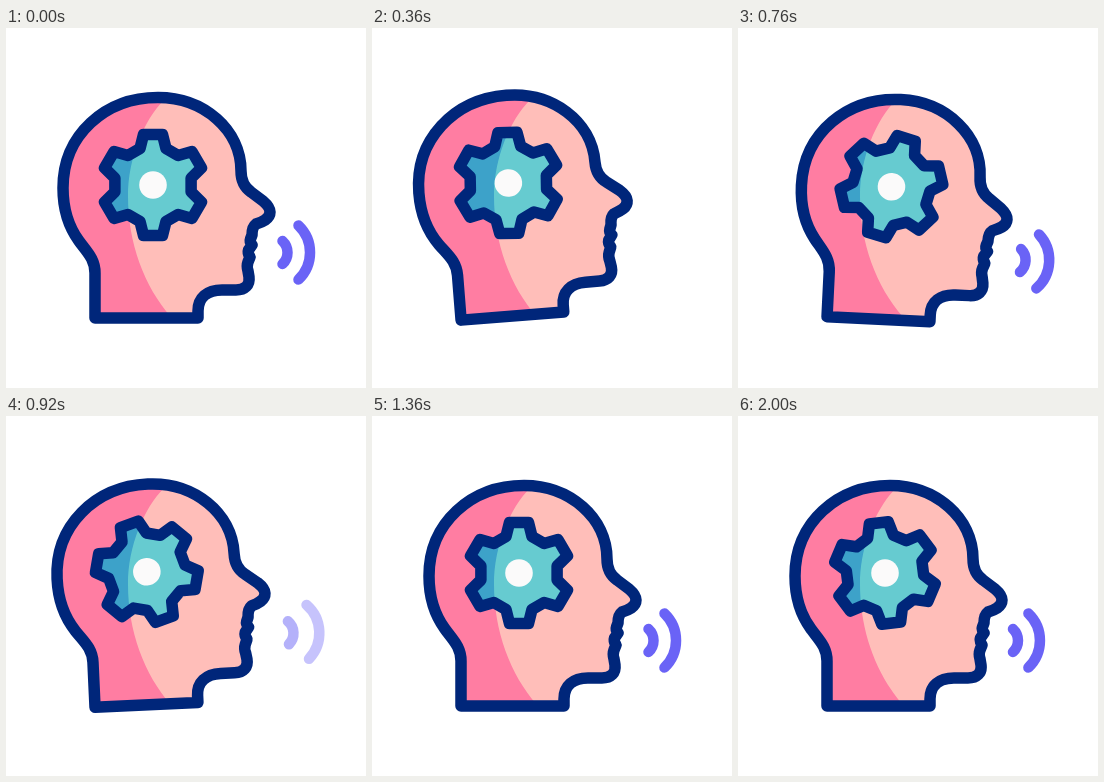
An HTML page that plays this animation: 360 by 360 pixels, repeating every 2.04 s.

```html
<!DOCTYPE html>
<html lang="en">
<head>
<meta charset="utf-8">
<title>Thinking and speaking</title>
<style>
  html, body { margin: 0; width: 100%; height: 100%; overflow: hidden; background: #fff; }
  svg { display: block; width: 100vw; height: 100vh; }
  .line { fill: none; stroke: #00267a; stroke-width: 11.5; stroke-linejoin: round; stroke-linecap: round; }
  .wave { fill: none; stroke: #6a63f6; stroke-width: 10.5; stroke-linecap: round; }
</style>
</head>
<body>
<svg viewBox="0 0 360 360">
  <defs>
    <path id="skull" d="M89 290 V245 C89 231 81 224 73 213 C62 198 57 180 57 160
      C57 107 99 69.500 152 69.500 C198 69.500 235 102 235 143
      C235 152 238 159 245 164 L257 173 Q264 179 264 184 C264 191 256 194 250 196
      Q246 199 246 207 L244.500 211 Q243.500 214 246 217 L242.500 222 Q241.500 225 244 229
      L242 234 Q240.500 238 242 243 L243 249 C244 257 239 262 230 262
      H216 C201 262 192 270 192 283 V290 Z"/>
    <path id="shade" d="M0 0 H220 L158 72 C138 92 122 130 122 168 C122 215 138 258 165 289 V360 H0 Z"/>
    <clipPath id="inHead"><use href="#skull"/></clipPath>
    <clipPath id="inShade"><use class="still" href="#shade"/></clipPath>
  </defs>
  <g id="head">
    <use href="#skull" fill="#ffbeb9"/>
    <g clip-path="url(#inHead)"><use class="still" href="#shade" fill="#ff7da2"/></g>
    <use href="#skull" class="line"/>
    <path class="cog" fill="#66cbd0"/>
    <g clip-path="url(#inShade)"><path class="cog" fill="#3da2c9"/></g>
    <path class="cog line"/>
    <circle cx="147" cy="157" r="13.800" fill="#fbfafa"/>
    <path id="inner" class="wave" d="M276.500 213 A15.700 15.700 0 0 1 276.500 236"/>
    <path id="outer" class="wave" d="M292.500 197.500 A37.400 37.400 0 0 1 292.500 251.500"/>
  </g>
</svg>
<script>
  const LOOP = 2040, STEP = 40, PULSE = 680;
  const NECK = '116 290', HUB = '147 157';
  const head = document.getElementById('head');
  const inner = document.getElementById('inner');
  const outer = document.getElementById('outer');
  const cogs = document.querySelectorAll('.cog');
  const still = document.querySelectorAll('.still');

  // head tilt: [time, degrees]
  const tilt = [[0, 0], [320, -5], [640, 5.5], [960, -3], [1280, 0], [LOOP, 0]];

  const clamp = x => Math.max(0, Math.min(1, x));
  const ramp = (t, a, b) => clamp((t - a) / (b - a));
  const smooth = x => x * x * (3 - 2 * x);
  const turn = (el, angle, pivot) => el.setAttribute('transform', `rotate(${angle} ${pivot})`);

  function tiltAt(t) {
    const i = tilt.findIndex(k => k[0] > t);
    const [t0, a] = tilt[i - 1], [t1, b] = tilt[i];
    return a + (b - a) * smooth(ramp(t, t0, t1));
  }

  function cogPath() {
    const tooth = [[-13, -36.5], [-9.5, -50.5], [9.5, -50.5], [13, -36.5]];
    const points = [];
    for (let i = 0; i < 6; i++) {
      const c = Math.cos(i * Math.PI / 3), s = Math.sin(i * Math.PI / 3);
      for (const [x, y] of tooth)
        points.push((147 + x * c - y * s).toFixed(2) + ' ' + (157 + x * s + y * c).toFixed(2));
    }
    return 'M' + points.join('L') + 'Z';
  }

  // p is the time from the pulse's beat; the wave drifts outward and fades
  function drawWave(el, p, speed, fade) {
    el.setAttribute('transform', `translate(${speed * p} 0)`);
    el.setAttribute('opacity', ramp(p, -145, -60) * (1 - ramp(p, fade, 280)));
  }

  function draw(t) {
    const angle = tiltAt(t);
    turn(head, angle, NECK);
    // the shading stays put while the head tilts
    still.forEach(el => turn(el, -angle, NECK));
    cogs.forEach(el => turn(el, 360 * t / LOOP, HUB));

    const p = (t + 160) % PULSE - 160;
    drawWave(inner, p, 0.038, 200);
    drawWave(outer, p, 0.052, 175);
  }

  const shape = cogPath();
  cogs.forEach(cog => cog.setAttribute('d', shape));

  const start = performance.now();
  function tick() {
    const t = (performance.now() - start) % LOOP;
    draw(Math.floor(t / STEP) * STEP);
    requestAnimationFrame(tick);
  }
  tick();
</script>
</body>
</html>
```
